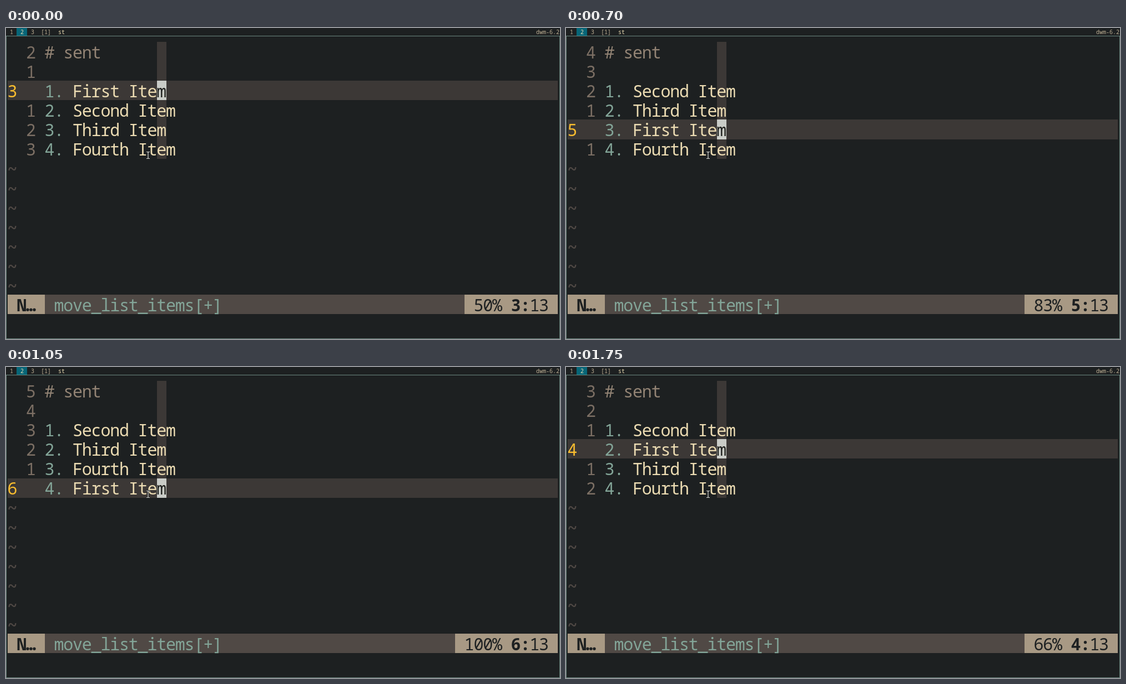
These frames come from a looping animation (998 px wide and 561 px high, 2100 ms). An HTML page with a canvas:

```html
<!DOCTYPE html>
<html lang="en">
<head>
<meta charset="utf-8">
<title>Moving list items</title>
<style>
  html, body { margin: 0; width: 100%; height: 100%; overflow: hidden; background: #1d2021; }
  canvas { display: block; }
</style>
</head>
<body>
<canvas id="stage" width="998" height="561"></canvas>
<script>
const ctx = document.getElementById('stage').getContext('2d');
const STEP_MS = 350, STEPS = 6;
const LEFT = 3, TOP = 25, CELL_W = 16.8, CELL_H = 35.1, COLS = 59;
const FONT = '"Noto Sans Mono", "DejaVu Sans Mono", monospace';
const LINES = 6, FIRST_ITEM_LINE = 3, STATUS_ROW = 13, CURSOR_COL = 16;
const color = {
  bg: '#1d2021', line: '#3c3836', dim: '#504945', number: '#7c6f64', heading: '#928374',
  tan: '#a89984', aqua: '#83a598', text: '#ebdbb2', yellow: '#fabd2f',
  cursor: '#c9ccc7', tag: '#076678', bar: '#bdae93'
};

const cellX = col => LEFT + col * CELL_W;
const cellY = row => TOP + row * CELL_H;

function rect(x, y, w, h, fill) {
  ctx.fillStyle = fill;
  ctx.fillRect(x, y, w, h);
}

// Fill whole terminal cells, snapped to pixels.
function fillCells(col, row, cols, rows, fill) {
  const x = Math.round(cellX(col)), y = Math.round(cellY(row));
  rect(x, y, Math.round(cellX(col + cols)) - x, Math.round(cellY(row + rows)) - y, fill);
}

// Write one character per cell, centred in the cell.
function write(text, col, row, fill, weight = 400) {
  ctx.font = `${weight} 30px ${FONT}`;
  ctx.textAlign = 'center';
  ctx.fillStyle = fill;
  [...text].forEach((char, i) =>
    ctx.fillText(char, cellX(col + i + 0.5), cellY(row) + 29.8));
}

function drawTopBar() {
  rect(19, 0, 19, 14, color.tag);
  ctx.font = `10px ${FONT}`;
  ctx.textAlign = 'left';
  const label = (text, x, fill = color.bar) => {
    ctx.fillStyle = fill;
    ctx.fillText(text, x, 11);
  };
  label('1', 7);
  label('2', 26, color.text);
  label('3', 45);
  label('[1]', 63);
  label('st', 94, color.text);
  label('dwm-6.2', 955);
  ctx.strokeStyle = '#6b8880';
  ctx.lineWidth = 1;
  ctx.strokeRect(0.5, 14.5, 997, 546);
}

function drawBuffer(current) {
  const items = ['Second', 'Third', 'Fourth'];
  items.splice(current - FIRST_ITEM_LINE, 0, 'First');

  fillCells(CURSOR_COL, 0, 1, LINES, color.line);
  fillCells(0, current - 1, COLS, 1, color.line);
  fillCells(CURSOR_COL, current - 1, 1, 1, color.cursor);

  for (let line = 1; line <= LINES; line++) {
    if (line === current) write(`${line}`, 0, line - 1, color.yellow);
    else write(`${Math.abs(line - current)}`, 2, line - 1, color.number);
  }
  write('# sent', 4, 0, color.heading);
  items.forEach((item, i) => {
    const row = FIRST_ITEM_LINE - 1 + i;
    write(`${i + 1}.`, 4, row, color.aqua);
    write(`${item} Item`, 7, row, color.text);
  });
  write('m', CURSOR_COL, current - 1, color.bg);
  for (let row = LINES; row < STATUS_ROW; row++) write('~', 0, row, color.dim, 700);
}

function drawStatus(current) {
  const percent = `${Math.floor(current * 100 / LINES)}%`;
  const start = COLS - percent.length - 7;
  fillCells(0, STATUS_ROW, COLS, 1, color.dim);
  fillCells(0, STATUS_ROW, 4, 1, color.tan);
  fillCells(start, STATUS_ROW, COLS - start, 1, color.tan);
  write('N…', 1, STATUS_ROW, color.bg, 700);
  write('move_list_items[+]', 5, STATUS_ROW, color.aqua);
  write(percent, start + 1, STATUS_ROW, color.bg);
  write(`${current}:`, 54, STATUS_ROW, color.bg, 700);
  write('13', 56, STATUS_ROW, color.bg);
}

function drawPointer() {
  const beam = new Path2D('M253 223.5h2l1 1l1-1h2M256 224.5v10M253 235.5h2l1-1l1 1h2');
  for (const [width, stroke] of [[3, color.bg], [1.2, '#d5d5d0']]) {
    ctx.lineWidth = width;
    ctx.strokeStyle = stroke;
    ctx.stroke(beam);
  }
}

function frame() {
  const step = Math.floor(performance.now() / STEP_MS) % STEPS;
  const current = LINES - Math.abs(3 - step);
  rect(0, 0, 998, 561, color.bg);
  drawTopBar();
  drawBuffer(current);
  drawStatus(current);
  drawPointer();
  requestAnimationFrame(frame);
}
frame();
</script>
</body>
</html>
```
